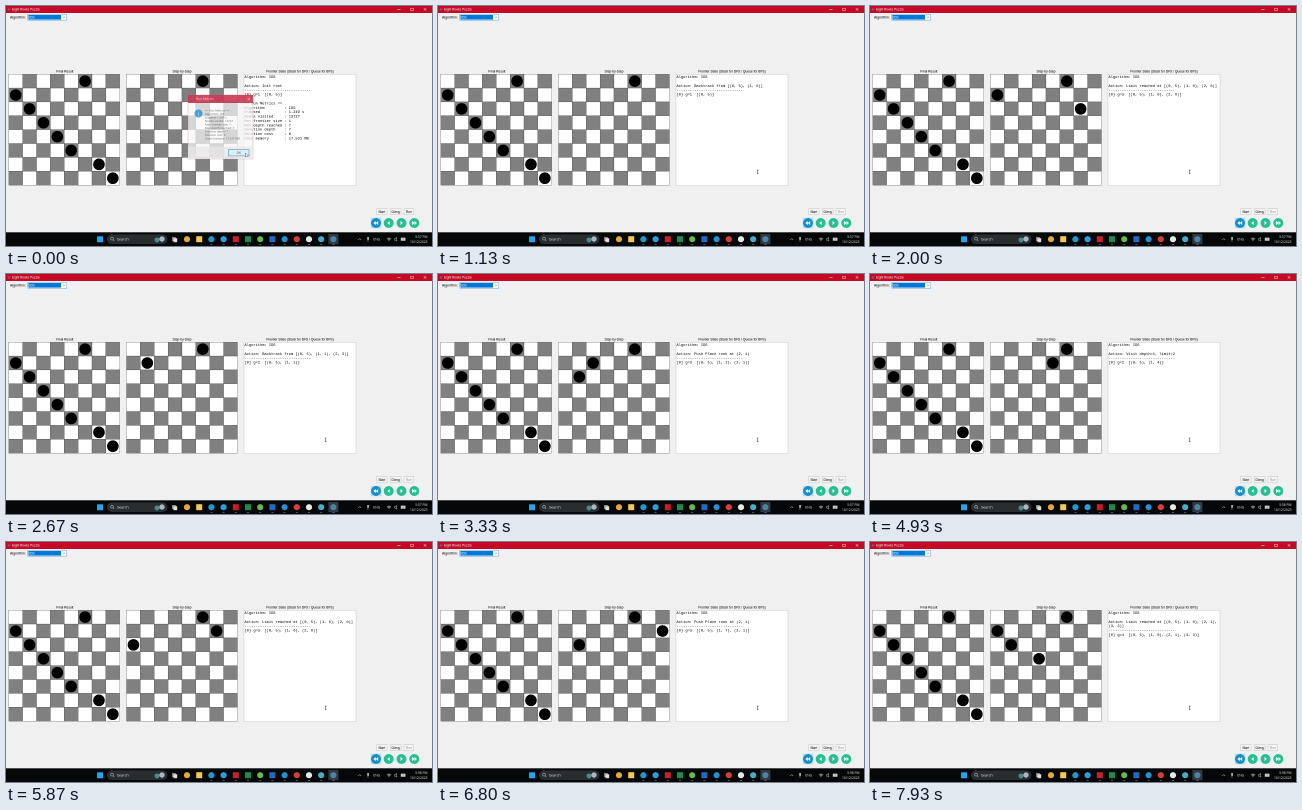
An HTML page with a canvas that plays this animation: 426x240 px, repeating every 8000 ms.

```html
<!DOCTYPE html>
<html lang="en">
<head>
<meta charset="utf-8">
<title>Eight Rooks Puzzle</title>
<style>
  html, body { margin: 0; width: 100%; height: 100%; overflow: hidden; background: #f0f0f0; }
  canvas { display: block; width: 426px; height: 240px; }
</style>
</head>
<body>
<canvas id="stage" width="852" height="480"></canvas>
<script>
const LOOP = 8000, FRAME = 1000 / 15;
const CELL = 13.87, BOARD_TOP = 68.2;
const SANS = '"Liberation Sans", Arial, sans-serif';
const UI = '"Open Sans", sans-serif';
const MONO = '"Liberation Mono", monospace';
const ctx = document.getElementById('stage').getContext('2d');

const SOLUTION = [5, 0, 1, 2, 3, 4, 6, 7];
const METRICS = [
  '== Run Metrics ==',
  ...[['Algorithm', 'IDS'], ['Elapsed', '1.249 s'], ['Nodes visited', '13727'],
    ['Max frontier size', '1'], ['Max depth reached', '7'], ['Solution depth', '7'],
    ['Solution cost', '8'], ['Used memory', '17.531 MB']]
    .map(([name, value]) => `${name.padEnd(18)}: ${value}`)
];

// Playback: [time in ms, position in the list of search steps]
const PACE = [[0, 0], [250, 0], [1133, 21.5], [2000, 42.5], [3333, 74.5],
  [4933, 112.5], [6800, 158.5], [7933, 184.5], [8000, 186]];

const formatPath = path => `[${path.map((col, row) => `(${row}, ${col})`).join(', ')}]`;

function iterativeDeepening(maxLimit) {
  const steps = [];
  const emit = (action, path) => steps.push({ action, path });
  function search(path, limit) {
    const depth = path.length - 1;
    if (depth === limit) return emit(`Limit reached at ${formatPath(path)}`, path);
    emit(`Visit depth=${depth}, limit=${limit}`, path);
    for (let col = 0; col < 8; col++) {
      if (path.includes(col)) continue;
      const next = [...path, col];
      emit(`Push Place rook at (${path.length}, ${col})`, next);
      search(next, limit);
      emit(`Backtrack from ${formatPath(next)}`, path);
    }
  }
  for (let limit = 0; limit <= maxLimit; limit++) {
    emit('Init root', [5]);
    search([5], limit);
  }
  return steps;
}
const STEPS = iterativeDeepening(3);

function stepAt(t) {
  const i = PACE.findIndex(([time]) => time > t);
  const [t0, p0] = PACE[i - 1], [t1, p1] = PACE[i];
  return Math.floor(p0 + (p1 - p0) * (t - t0) / (t1 - t0));
}

function rect(x, y, w, h, fill, stroke, lineWidth = 0.4) {
  if (fill) { ctx.fillStyle = fill; ctx.fillRect(x, y, w, h); }
  if (stroke) {
    ctx.strokeStyle = stroke;
    ctx.lineWidth = lineWidth;
    ctx.strokeRect(x, y, w, h);
  }
}

function circle(x, y, r, fill) {
  ctx.fillStyle = fill;
  ctx.beginPath();
  ctx.arc(x, y, r, 0, 2 * Math.PI);
  ctx.fill();
}

function line(points, color, width = 0.5) {
  ctx.strokeStyle = color;
  ctx.lineWidth = width;
  ctx.beginPath();
  points.forEach(([x, y]) => ctx.lineTo(x, y));
  ctx.stroke();
}

// Type is set ten times larger and scaled down to keep fractional letter widths.
function text(str, x, y, size, color = '#000', family = SANS, align = 'left') {
  ctx.save();
  ctx.translate(x, y);
  ctx.scale(0.1, 0.1);
  ctx.font = `${size * 10}px ${family}`;
  ctx.textAlign = align;
  ctx.fillStyle = color;
  ctx.fillText(str, 0, 0);
  ctx.restore();
}

function wrap(str, limit) {
  const lines = [''];
  for (const word of str.match(/\S+\s*/g) || []) {
    const last = lines.length - 1;
    if ((lines[last] + word.trimEnd()).length > limit) lines.push(word);
    else lines[last] += word;
  }
  return lines;
}

function drawBoard(left, rooks) {
  rect(left, BOARD_TOP, CELL * 8, CELL * 8, '#fff');
  for (let row = 0; row < 8; row++)
    for (let col = 0; col < 8; col++)
      rect(left + col * CELL, BOARD_TOP + row * CELL, CELL, CELL,
        (row + col) % 2 ? '#808080' : '#fff', '#333', 0.25);
  rooks.forEach((col, row) =>
    circle(left + (col + 0.5) * CELL, BOARD_TOP + (row + 0.5) * CELL, 5.8, '#000'));
}

function drawLog({ action, path }, withMetrics) {
  rect(238, 68.2, 112, 111.6, '#fff', '#aaa', 0.3);
  const lines = ['Algorithm: IDS', '', ...wrap(`Action: ${action}`, 50), '-'.repeat(30),
    `[0] g=${path.length}  ${formatPath(path)}`];
  if (withMetrics) lines.push('', ...METRICS);
  lines.forEach((str, i) => text(str, 238.5, 72.1 + i * 4.38, 3.69, '#000', MONO));
}

function drawButton(label, x, w, enabled = true) {
  rect(x, 202.7, w, 5.8, '#f4f4f4', '#aaa', 0.3);
  text(label, x + w / 2, 206.8, 3.3, enabled ? '#000' : '#999', SANS, 'middle' && 'center');
}

function drawPlayer(x, direction, arrows, focused) {
  if (focused) rect(x - 5.2, 211.8, 10.4, 10.4, '#b9dcf2');
  circle(x, 217, 5, focused ? '#168fc4' : '#26bf92');
  ctx.fillStyle = '#fff';
  for (let i = 0; i < arrows; i++) {
    const cx = x + (i - (arrows - 1) / 2) * 2.4;
    ctx.beginPath();
    ctx.moveTo(cx + direction * 1.4, 217);
    ctx.lineTo(cx - direction * 1, 215);
    ctx.lineTo(cx - direction * 1, 219);
    ctx.fill();
  }
}

function drawWindow(step, index) {
  rect(0, 0, 426, 240, '#f0f0f0');
  rect(0, 0, 426, 7, '#c40a25');
  circle(3, 3.4, 1.3, '#7d4d90');
  text('Eight Rooks Puzzle', 6, 4.6, 3.2, '#fff');
  line([[391.5, 3.5], [394.5, 3.5]], '#fff');
  rect(404.8, 2.2, 2.4, 2.4, null, '#fff');
  line([[417.7, 2.1], [420.3, 4.7]], '#fff');
  line([[420.3, 2.1], [417.7, 4.7]], '#fff');

  text('Algorithm:', 4, 12.4, 3.5);
  rect(21.8, 8.4, 39, 5.8, '#fff', '#4a90c8');
  rect(22.4, 9, 32.6, 4.6, '#0078d7');
  text('IDS', 23, 12.4, 3.4, '#fff');
  line([[57, 10.7], [58, 11.8], [59, 10.7]], '#333', 0.4);

  text('Final Result', 58.8, 66.3, 3.25, '#000', SANS, 'center');
  text('Step-by-Step', 176, 66.3, 3.25, '#000', SANS, 'center');
  text('Frontier State (Stack for DFS / Queue for BFS)', 294, 66.3, 3.25, '#000', SANS, 'center');
  drawBoard(2.8, SOLUTION);
  drawBoard(120.5, step.path);
  drawLog(step, index === 0);

  drawButton('Start', 370.6, 10.4);
  drawButton('Dừng', 384.2, 10.8);
  drawButton('Run', 398, 9.6, index === 0);
  drawPlayer(370, -1, 2, true);
  drawPlayer(382.7, -1, 1);
  drawPlayer(395.5, 1, 1);
  drawPlayer(408.3, 1, 2);
}

function drawTaskbar(t) {
  rect(0, 226.3, 426, 13.7, '#050708');
  rect(91, 230.3, 6, 6, '#25a4e8');
  ctx.fillStyle = '#292d30';
  ctx.beginPath();
  ctx.roundRect(101, 228.4, 60.5, 9.6, 4.8);
  ctx.fill();
  ctx.strokeStyle = '#ddd';
  ctx.lineWidth = 0.5;
  ctx.beginPath();
  ctx.arc(106, 232.7, 1.4, 0, 2 * Math.PI);
  ctx.stroke();
  line([[107, 233.7], [108.2, 235]], '#ddd');
  text('Search', 111, 234.6, 3.7, '#eee', UI);
  circle(151, 234, 2.5, '#4e8b87');
  circle(156, 233, 2.7, '#a9b9c3');

  rect(166, 231, 3.8, 4, '#888');
  rect(167.4, 232.2, 3.8, 4, '#ddd');
  const apps = ['#e5a93a', '#f4c957', '#1d9bd1', '#2d9fe0', '#c91f2b', '#1d8b50', '#67b84b',
    '#2469be', '#248fd4', '#d8413a', '#e8e8e8', '#45aeca', '#4f82a8'];
  apps.forEach((color, i) => {
    const x = 181 + i * 12.2;
    if (i === 12) rect(x - 5, 228, 10, 10.2, '#303a42');
    if ([1, 4, 5, 7].includes(i)) rect(x - 3, 230.2, 6, 6, color);
    else circle(x, 233.2, 3.1, color);
    if (i > 1) rect(x - 1, 238.2, 2, 0.6, i === 12 ? '#45b5e8' : '#888');
  });

  line([[352.2, 234], [353.7, 232.5], [355.2, 234]], '#eee');
  rect(361.4, 231, 1.3, 2.8, '#eee');
  line([[362, 233.8], [362, 235.7]], '#eee', 0.4);
  text('ENG', 367.3, 234.5, 3.3, '#eee', UI);
  for (const r of [1, 2, 3]) {
    ctx.strokeStyle = '#eee';
    ctx.lineWidth = 0.5;
    ctx.beginPath();
    ctx.arc(383, 235, r, -2.36, -0.78);
    ctx.stroke();
  }
  line([[388.6, 232.5], [389.5, 232.5], [390.6, 231.3], [390.6, 235.2],
    [389.5, 234.1], [388.6, 234.1], [388.6, 232.5]], '#eee', 0.4);
  rect(395, 231.9, 4.2, 2.6, '#bbb', '#eee');
  text(t < 4100 ? '5:57 PM' : '5:58 PM', 421.5, 232.2, 3.3, '#eee', UI, 'right');
  text('10/12/2025', 421.5, 237, 3.3, '#eee', UI, 'right');
}

function drawDialog(opacity) {
  ctx.save();
  ctx.globalAlpha = opacity;
  rect(182, 89, 65, 64, '#f7f7f7', '#b77', 0.4);
  rect(182, 89, 65, 8, '#bd0b2b');
  text('Run Metrics', 190, 94.2, 3.2, '#fff', UI);
  line([[241.5, 91.7], [244, 94.2]], '#fff');
  line([[244, 91.7], [241.5, 94.2]], '#fff');
  circle(192.5, 107.5, 4, '#1686cb');
  text('i', 192.5, 109.8, 6, '#fff', SANS, 'center');
  METRICS.forEach((str, i) =>
    text(str.replace(/ +:/, ':'), 199, 105.5 + i * 3.5, 2.9, '#333', UI));
  rect(182, 140.5, 65, 12.5, '#e8e8e8');
  rect(222.5, 143.7, 20.5, 6.2, '#e1edf5', '#0878c8', 0.6);
  text('OK', 232.8, 148, 3.1, '#111', UI, 'center');
  ctx.restore();
}

function drawPointer(t) {
  if (t < 250) {
    ctx.beginPath();
    for (const [x, y] of [[0, 0], [0, 4], [1, 3.2], [2.8, 3]]) ctx.lineTo(239.5 + x, 147 + y);
    ctx.closePath();
    ctx.fillStyle = '#fff';
    ctx.fill();
    ctx.strokeStyle = '#000';
    ctx.lineWidth = 0.3;
    ctx.stroke();
  } else {
    line([[319.7, 164], [319.7, 167.8]], '#222', 0.5);
    line([[318.9, 164], [320.5, 164]], '#222', 0.4);
    line([[318.9, 167.8], [320.5, 167.8]], '#222', 0.4);
  }
}

function draw(now) {
  const t = Math.floor((now % LOOP) / FRAME + 0.06) * FRAME % LOOP;
  const index = stepAt(t);
  ctx.setTransform(2, 0, 0, 2, 0, 0);
  drawWindow(STEPS[index], index);
  drawTaskbar(t);
  const opacity = 0.72 - t / 140;
  if (opacity > 0) drawDialog(opacity);
  drawPointer(t);
}

const start = performance.now();
function tick() {
  draw(performance.now() - start);
  requestAnimationFrame(tick);
}
tick();
</script>
</body>
</html>
```
